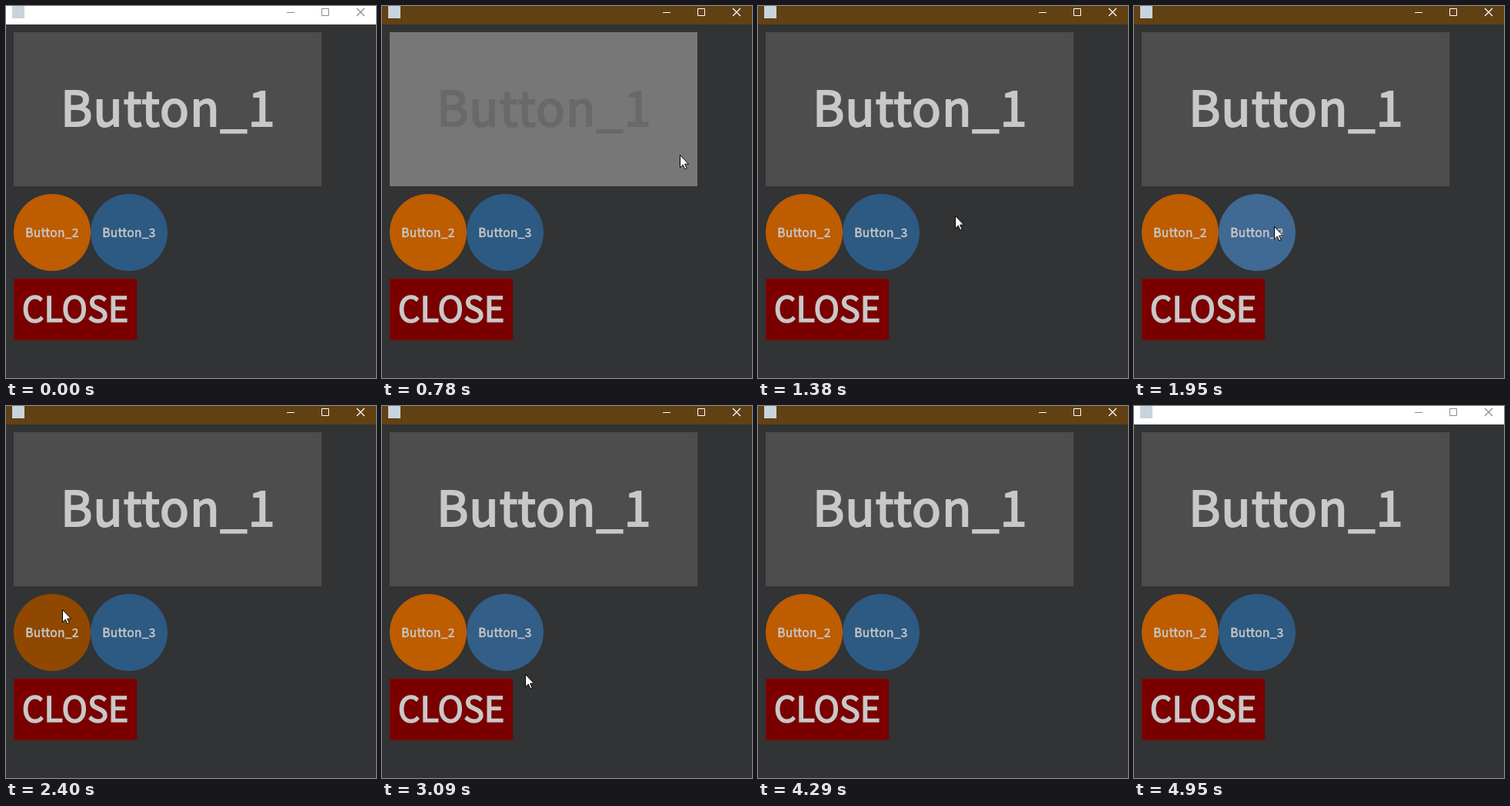
Animation, 481 px wide and 483 px high, one loop 5.04 s. Source, as an HTML page:

```html
<!DOCTYPE html>
<html lang="en">
<head>
<meta charset="utf-8">
<title>Buttons</title>
<style>
  html, body { margin: 0; width: 100%; height: 100%; overflow: hidden; background: #323334; }
  svg { display: block; width: 481px; height: 483px; fill: currentColor; }
  text {
    font-family: "Noto Sans CJK SC", "Noto Sans CJK JP", "Open Sans", sans-serif;
    font-weight: 400; text-anchor: middle; color: #c8c8c8;
    stroke: currentColor; stroke-width: .035em;
  }
  .spaced { letter-spacing: .02em; }
</style>
</head>
<body>
<svg viewBox="0 0 481 483">
  <rect width="481" height="483" fill="#323334"/>
  <rect y="482" width="481" height="1" fill="#3a3130"/>
  <rect id="bar" width="481" height="24"/>
  <rect x="8" width="16" height="16" fill="#c9d3dc"/>
  <g id="controls" fill="none" stroke="currentColor">
    <path d="M365 8.5h10M410.5 3.5h9v9h-9z"/>
    <path d="M456 3l10 10M466 3l-10 10" stroke-width="1.3"/>
  </g>
  <rect id="big" x="10" y="34" width="400" height="200"/>
  <text id="bigText" class="spaced" x="211" y="156" font-size="62.5">Button_1</text>
  <circle id="orange" cx="60" cy="294" r="50"/>
  <text class="spaced" x="60" y="300" font-size="15.5">Button_2</text>
  <circle id="blue" cx="160" cy="294" r="50"/>
  <text class="spaced" x="160" y="300" font-size="15.5">Button_3</text>
  <rect id="close" x="10" y="354" width="160" height="80"/>
  <text x="90" y="410" font-size="45">CLOSE</text>
  <path id="cursor" d="M.5.5V16.8L4.3 13.2 6.9 18.9 9.2 17.9 6.7 12.2H11.6Z" fill="#fff" stroke="#000"/>
</svg>
<script>
const LOOP = 5040, STEP = 30;
const $ = id => document.getElementById(id);
const ease = {
  lin: u => u,
  in: u => u ** 1.5,
  out: u => 1 - (1 - u) ** 1.7,
  both: u => u * u * (3 - 2 * u)
};

// Each key: time, values, easing of the way to that key
function track(keys, t) {
  let a = keys[0];
  for (const b of keys) {
    if (t < b[0]) {
      if (a === b) return a[1];
      const u = ease[b[2] || 'lin']((t - a[0]) / (b[0] - a[0]));
      return a[1].map((v, i) => v + (b[1][i] - v) * u);
    }
    a = b;
  }
  return a[1];
}

const path = [
  [360, [470, 62]],
  [570, [387, 193], 'out'],
  [1080, [387, 193]],
  [1380, [256, 272], 'in'],
  [1590, [197, 288]],
  [1770, [182, 286], 'out'],
  [2160, [182, 286]],
  [2400, [73, 264], 'both'],
  [2880, [73, 264]],
  [3090, [186, 348], 'both'],
  [3150, [186, 348]],
  [3360, [142, 360], 'both'],
  [3780, [142, 360]],
  [4260, [462, 297], 'both']
];

const gray = [77, 77, 77], grayDown = [166, 166, 166];
const ink = [200, 200, 200], inkDown = [0, 0, 0];
const amber = [190, 92, 0], amberOver = [144, 72, 0], amberDown = [108, 54, 0];
const sea = [45, 90, 130], seaOver = [70, 110, 152], seaPass = [51, 94, 135];
const red = [122, 0, 0], redDown = [165, 0, 0];

const hold = (from, to, t0, t1, t2, t3) => [[t0, from], [t1, to], [t2, to], [t3, from]];

const colors = {
  big: hold(gray, grayDown, 720, 846, 1050, 1200),
  bigText: hold(ink, inkDown, 720, 846, 1050, 1200),
  orange: [
    [2250, amber], [2400, amberOver], [2520, amberOver], [2640, amberDown],
    [2880, amberDown], [3060, amber]
  ],
  blue: [
    ...hold(sea, seaOver, 1590, 1800, 1920, 2040),
    ...hold(sea, seaPass, 2970, 3060, 3150, 3240)
  ],
  close: hold(red, redDown, 3480, 3540, 3780, 3900)
};

function draw(time) {
  const t = Math.floor(time % LOOP / STEP) * STEP;
  const active = t >= 750 && t < 4950;
  $('bar').style.color = active ? '#614014' : '#fff';
  $('controls').style.color = active ? '#fff' : '#8c8c8c';
  for (const id in colors) {
    $(id).style.color = `rgb(${track(colors[id], t).map(Math.round)})`;
  }
  const [x, y] = track(path, t).map(Math.round);
  $('cursor').setAttribute('transform', `translate(${x} ${y})`);
  $('cursor').setAttribute('visibility', t >= 360 && t < 4290 ? 'visible' : 'hidden');
}

const start = performance.now();
function tick() {
  draw(performance.now() - start);
  requestAnimationFrame(tick);
}
tick();
</script>
</body>
</html>
```
